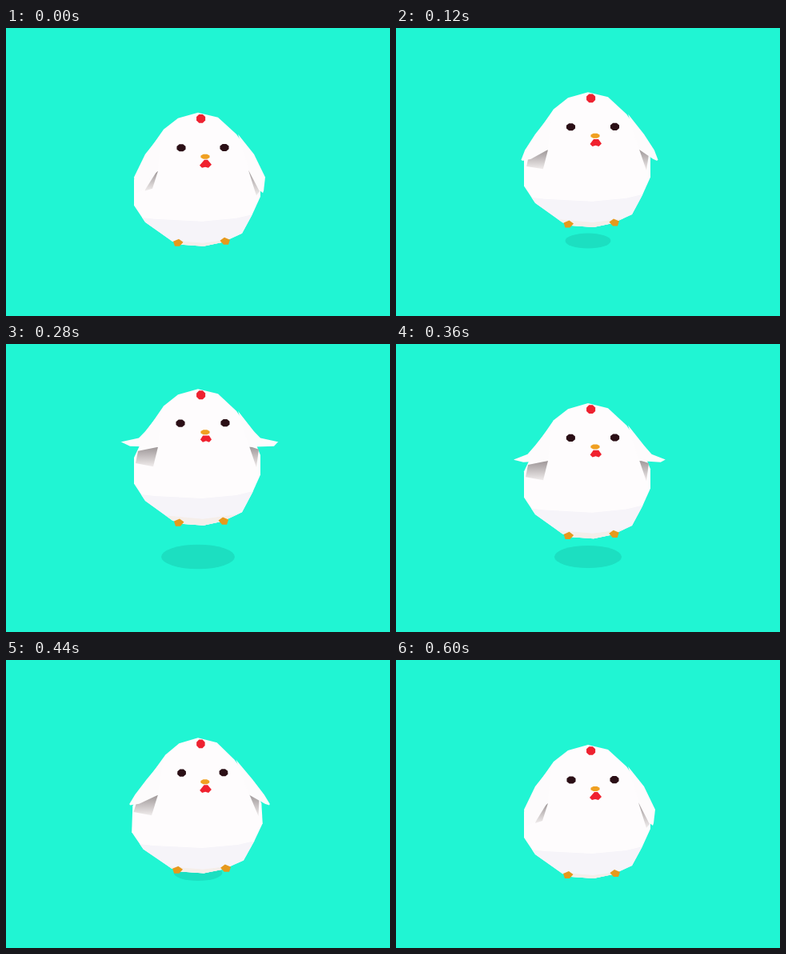
Animation of 480 by 360 pixels, one loop 0.64 s. Source, as an HTML page:

```html
<!DOCTYPE html>
<html lang="en">
<head>
<meta charset="utf-8">
<title>Hopping chick</title>
<style>
  html, body { margin: 0; width: 100%; height: 100%; overflow: hidden; background: #20f5d3; }
  svg { display: block; width: 100%; height: 100%; }
</style>
</head>
<body>
<svg viewBox="0 0 480 360">
  <defs>
    <clipPath id="bodyClip"><polygon id="clip"/></clipPath>
    <linearGradient id="shade" x1="0" y1="0" x2="0" y2="1">
      <stop offset="0" stop-color="#9d9697"/><stop offset="1" stop-color="#f0ecec"/>
    </linearGradient>
  </defs>
  <ellipse id="shadow" cx="240" cy="266" fill="#1cdfc1"/>
  <polygon id="body" fill="#fefcfd"/>
  <g clip-path="url(#bodyClip)">
    <polygon id="band" fill="#f6f4f9"/>
    <polygon id="base" fill="#f5eeea"/>
  </g>
  <g fill="url(#shade)">
    <polygon id="leftUnder"/>
    <polygon id="rightUnder"/>
  </g>
  <g fill="#fdfbfc">
    <polygon id="leftWing"/>
    <polygon id="rightWing"/>
  </g>
  <g fill="#e6991c">
    <polygon id="leftFoot"/>
    <polygon id="rightFoot"/>
  </g>
  <g fill="#2b0f16">
    <polygon id="leftEye"/>
    <polygon id="rightEye"/>
  </g>
  <polygon id="wattle" fill="#f0222f"/>
  <polygon id="beak" fill="#f0a021"/>
  <polygon id="comb" fill="#ee2230"/>
</svg>
<script>
const LOOP = 640, STEP = 40;

const outline = [
  [240, 106], [215, 113], [197, 127], [176, 157], [160, 190], [160, 222],
  [174, 243], [208, 267], [219, 271], [247, 273], [271, 268], [295, 257],
  [308, 233], [318, 211], [318, 187], [307, 160], [288, 133], [265, 112]
];
const wattle = {
  closed: [[242, 172], [248, 165], [252, 165], [257, 171], [253, 175], [249, 174], [245, 175]],
  open: [[243, 168], [246, 163], [254, 163], [257, 168], [254, 171], [250, 169.5], [246, 171]]
};
const leftUnder = {
  closed: [[190, 179], [177, 190], [174, 204], [183, 201]],
  open: [[190, 177], [165, 182], [162, 197], [184, 201]]
};
const rightUnder = {
  closed: [[303, 178], [317, 205], [313, 210]],
  open: [[304, 176], [316, 180], [313, 202]]
};
const foot = [[-6, -2], [1, -5], [6.5, -1], [2, 4], [-4, 4]];

const $ = id => document.getElementById(id);
const clamp = (v, lo, hi) => Math.min(hi, Math.max(lo, v));
const blend = ({ closed, open }, k) =>
  closed.map((p, i) => p.map((v, j) => v + (open[i][j] - v) * k));
const move = (points, x, y) => points.map(p => [p[0] + x, p[1] + y]);
const mirror = (points, axis) => points.map(([x, y]) => [2 * axis - x, y]);

// Smooth rise and fall between two times, zero elsewhere.
const bump = (t, from, to) =>
  t > from && t < to ? Math.sin(Math.PI * (t - from) / (to - from)) ** 2 : 0;

function blob(x, y, rx, ry, sides = 8) {
  return Array.from({ length: sides }, (_, i) => {
    const a = (i + .5) / sides * 2 * Math.PI;
    return [x + rx * Math.cos(a), y + ry * Math.sin(a)];
  });
}

// Left wing; flap runs from 0 (folded) to 2 (spread).
function wing(flap, innerX, hem) {
  const bend = flap * flap;
  const x = 162 - 3 * flap - 3.25 * bend;
  const y = 207 - 18 * flap;
  return [[194, 133], [174, 158], [160 + 1.5 * bend, 187 - 10.5 * flap],
    [x, y - 3 + 1.5 * flap], [x + 1, y], [x + hem, y - 4 + 2.25 * bend], [innerX, 177]];
}

function render(time) {
  const t = Math.floor(time % LOOP / STEP) * STEP;
  const hop = bump(t, -10, 510);
  const spread = bump(t, -25, 595);
  const impact = bump(t, 370, 590);
  const flap = 2 * spread;

  // Landing narrows the head and widens the belly.
  const place = ([x, y]) => {
    const bulge = clamp((y - 175) / 25, -1.5, 1);
    const lift = 51.5 * hop * (1 - .07 * (y - 106) / 166);
    return [x + (x - 240) * .05 * impact * bulge,
      y - lift + 2.2 * impact * Math.max(0, bulge)];
  };
  const draw = (id, points) => $(id).setAttribute('points',
    points.map(p => place(p).map(v => v.toFixed(2)).join()).join(' '));

  draw('body', outline);
  draw('clip', outline);
  draw('band', move([[150, 235], [186, 239], [245, 242], [288, 238],
    [330, 228], [330, 290], [150, 290]], 0, -2 * hop));
  draw('base', move([[180, 263], [246, 269], [300, 262], [300, 290], [180, 290]], 0, -4 * hop));

  const opening = Math.min(1, flap);
  draw('leftUnder', blend(leftUnder, opening));
  draw('rightUnder', blend(rightUnder, opening));
  draw('leftWing', wing(flap, 190, 12));
  draw('rightWing', mirror(wing(flap, 180, 6), 242));

  draw('leftFoot', move(foot, 215 + hop, 269 + hop));
  draw('rightFoot', move(mirror(foot, 0), 274 - 2 * hop, 267 + hop));

  const eyeY = 150 - 2 * hop;
  draw('leftEye', blob(219 - hop, eyeY, 6, 4.9));
  draw('rightEye', blob(273 + hop, eyeY - .4, 6, 4.9));
  draw('beak', blob(249, 161 - 2 * hop, 6, 3.2));
  draw('wattle', blend(wattle, hop));
  draw('comb', blob(243.6, 113.5, 6, 5.8));

  const radius = 46 * spread ** .6;
  $('shadow').setAttribute('rx', radius);
  $('shadow').setAttribute('ry', radius / 3);
}

const start = performance.now();
function tick() {
  render(performance.now() - start);
  requestAnimationFrame(tick);
}
tick();
</script>
</body>
</html>
```
